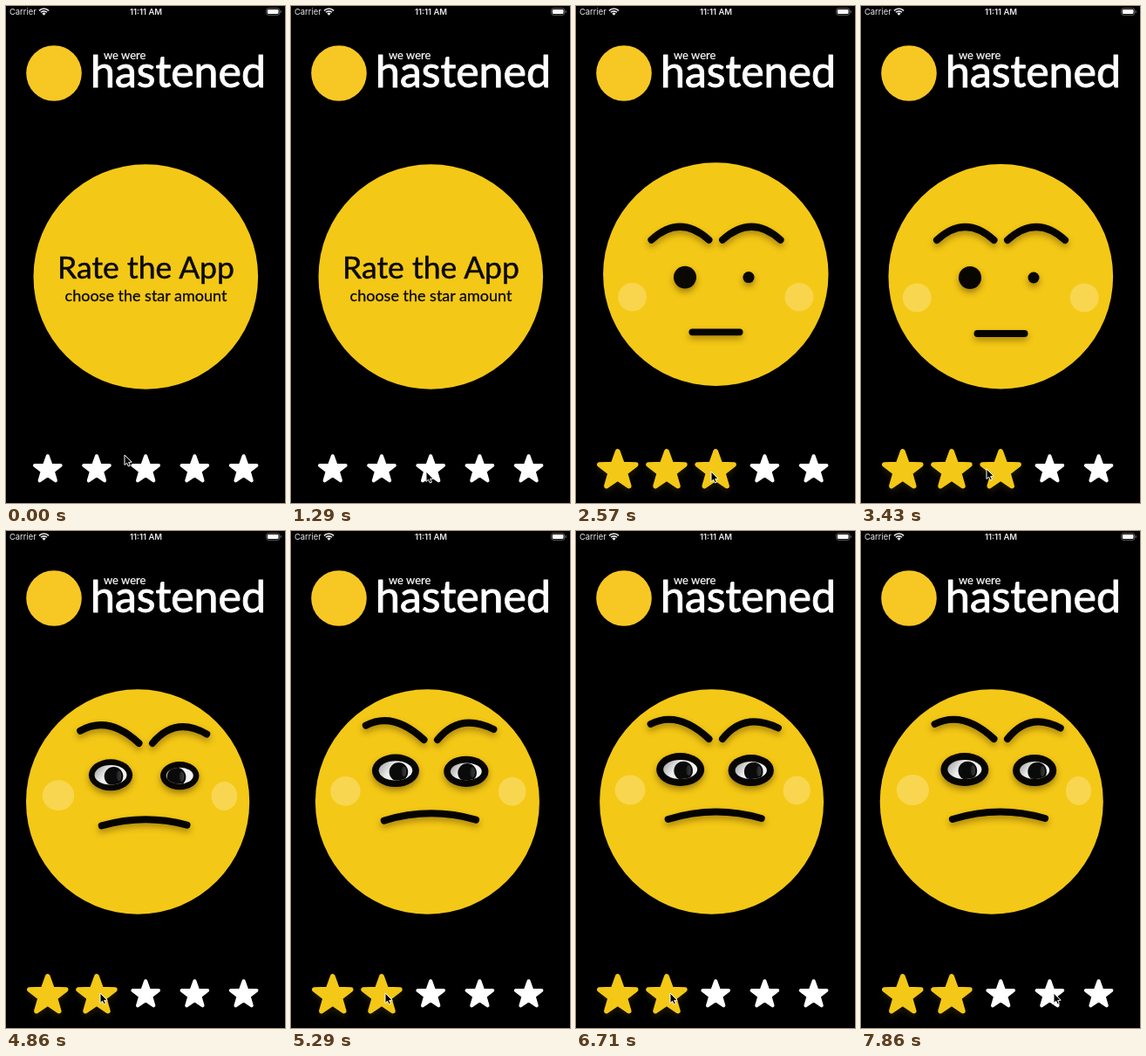
Animation of 320x569 px, one loop 8 s. Source, as an HTML page with a canvas:

```html
<!DOCTYPE html>
<html lang="en">
<head>
<meta charset="utf-8">
<title>Rate the App</title>
<style>
  html, body { margin: 0; width: 100%; height: 100%; overflow: hidden; background: #000; }
  canvas, svg { position: absolute; left: 0; top: 0; width: 320px; height: 569px; }
  text { font-family: Lato, "Open Sans", sans-serif; stroke-linejoin: round; }
  .bar { font-family: Inter, Roboto, sans-serif; fill: #e8e8e8; }
  .brand { fill: #fff; stroke: #fff; }
  #title { fill: #0b0a02; stroke: #0b0a02; text-anchor: middle; }
</style>
</head>
<body>
<canvas id="stage"></canvas>
<svg viewBox="0 0 320 569">
  <text class="bar" x="4" y="10" font-size="9.4">Carrier</text>
  <text class="bar" x="160.5" y="10" font-size="9.5" font-weight="600" text-anchor="middle">11:11 AM</text>
  <text class="brand" x="112" y="60.5" font-size="13" stroke-width=".2">we were</text>
  <text class="brand" x="97" y="93" font-size="50" stroke-width="1">hastened</text>
  <g id="title">
    <text x="160.5" y="312" font-size="35.5" stroke-width=".5">Rate the App</text>
    <text x="160.5" y="338" font-size="18" stroke-width=".3">choose the star amount</text>
  </g>
</svg>
<script>
const LOOP = 8000, TAP3 = 1500, TAP2 = 4140, HALF_TURN = 725;
const YELLOW = [244, 200, 22];
const canvas = document.getElementById('stage');
const title = document.getElementById('title');
const ctx = canvas.getContext('2d');
const dpr = window.devicePixelRatio || 1;
canvas.width = 320 * dpr;
canvas.height = 569 * dpr;

const clamp = v => Math.min(1, Math.max(0, v));
const mix = (a, b, p) => a + (b - a) * p;
const ease = v => { v = clamp(v); return v * v * (3 - 2 * v); };
const rgb = c => `rgb(${c.map(Math.round)})`;

// time, x, y of the pointer tip
const POINTER = [
  [0, 136, 514], [140, 136, 514], [1100, 155, 533], [2750, 155, 533],
  [3400, 144, 530], [3700, 144, 530], [4020, 108, 529],
  [7250, 108, 529], [7780, 221, 529], [LOOP, 221, 529]
];

function pointerAt(t) {
  const i = Math.max(1, POINTER.findIndex(k => k[0] > t));
  const a = POINTER[i - 1], b = POINTER[i];
  const p = ease((t - a[0]) / (b[0] - a[0]));
  return [mix(a[1], b[1], p), mix(a[2], b[2], p)];
}

function shadow(color, blur, dy) {
  ctx.shadowColor = color;
  ctx.shadowBlur = blur * dpr;
  ctx.shadowOffsetY = dy * dpr;
}
const noShadow = () => shadow('transparent', 0, 0);

function oval(x, y, rx, ry, fill) {
  ctx.beginPath();
  ctx.ellipse(x, y, Math.max(0, rx), Math.max(0, ry), 0, 0, Math.PI * 2);
  ctx.fillStyle = fill;
  ctx.fill();
}

// q: start, control and end point of a bent line
function bend(q, width) {
  ctx.beginPath();
  ctx.moveTo(q[0], q[1]);
  ctx.quadraticCurveTo(q[2], q[3], q[4], q[5]);
  ctx.lineWidth = width;
  ctx.lineCap = 'round';
  ctx.strokeStyle = '#050401';
  ctx.stroke();
}

function statusIcons() {
  ctx.strokeStyle = '#e8e8e8';
  ctx.lineCap = 'butt';
  ctx.lineWidth = 1.7;
  for (const r of [5, 7.8]) {
    ctx.beginPath();
    ctx.arc(43.5, 10.8, r, -Math.PI * 0.75, -Math.PI * 0.25);
    ctx.stroke();
  }
  ctx.beginPath();
  ctx.moveTo(43.5, 10.8);
  ctx.arc(43.5, 10.8, 3, -Math.PI * 0.75, -Math.PI * 0.25);
  ctx.fillStyle = '#e8e8e8';
  ctx.fill();

  ctx.lineWidth = 0.7;
  ctx.strokeStyle = '#888';
  ctx.beginPath();
  ctx.roundRect(298.7, 2.7, 15, 7.6, 2.2);
  ctx.stroke();
  ctx.fillStyle = '#fff';
  ctx.beginPath();
  ctx.roundRect(299.9, 3.9, 12.6, 5.2, 1.3);
  ctx.fill();
  ctx.fillStyle = '#888';
  ctx.fillRect(314.7, 5.2, 0.9, 2.6);
}

function star(x, on) {
  const R = mix(15.6, 22, on), y = mix(530.8, 531.8, on);
  const color = rgb(YELLOW.map(c => mix(255, c, on)));
  ctx.beginPath();
  for (let i = 0; i < 10; i++) {
    const r = i % 2 ? R * 0.41 : R, a = i * Math.PI / 5 - Math.PI / 2;
    ctx.lineTo(x + r * Math.cos(a), y + r * Math.sin(a));
  }
  ctx.closePath();
  ctx.lineJoin = 'round';
  ctx.lineWidth = mix(4, 5.6, on);
  ctx.fillStyle = ctx.strokeStyle = color;
  shadow(`rgba(244,200,22,${0.12 * on})`, 6, 4);
  ctx.stroke();
  noShadow();
  ctx.fill();
}

function stars(t) {
  const up = ease((t - TAP3) / 300), down = ease((t - TAP2) / 300);
  for (let i = 0; i < 5; i++) {
    star(47.8 + i * 56.2, i < 2 ? up : i === 2 ? up * (1 - down) : 0);
  }
}

function eye(x, y, rx, ry, open, px) {
  shadow('rgba(60,40,0,.45)', 7, 4);
  oval(x, y, rx, ry, '#080602');
  noShadow();
  if (open < 0.02) return;
  const ix = rx - 8 * open, iy = ry - 8 * open;
  ctx.save();
  ctx.globalAlpha *= ease(open * 1.5);
  const white = ctx.createLinearGradient(x - ix, y - iy, x + ix * 0.6, y + iy);
  white.addColorStop(0, '#999');
  white.addColorStop(0.45, '#eee');
  white.addColorStop(1, '#f4f4f4');
  oval(x, y, ix, iy, white);
  ctx.beginPath();
  ctx.ellipse(x, y, Math.max(0, ix), Math.max(0, iy), 0, 0, Math.PI * 2);
  ctx.clip();
  const r = 10.8;
  oval(px, y + 1.5, r, r, '#0a0a0a');
  const glint = ctx.createLinearGradient(px, y, px + r, y);
  glint.addColorStop(0, 'rgba(90,90,90,0)');
  glint.addColorStop(1, 'rgba(90,90,90,.8)');
  oval(px + r * 0.55, y + 1, r * 0.25, r * 0.55, glint);
  ctx.restore();
}

function face(t) {
  const s = (t - TAP3) / 1000, u = Math.max(0, t - TAP2) / 1000;
  // b: bounce of the first tap, m: frown, k: head turn
  const b = s < 0 ? 0 : 1.43 * ease(s / 0.25) * Math.exp(-3.24 * Math.max(0, s - 0.25));
  const w = 4.5 * u, m = 1 - (1 + w) * Math.exp(-w);
  const k = m * (1 - Math.cos(Math.PI * u * 1000 / HALF_TURN)) / 2;
  const cx = 160.3 - 11 * k;

  oval(cx, 310 - 29 * b, 128.8 + 4 * b - 0.8 * k, 128.8 - 9.5 * b, rgb(YELLOW));
  const shown = s < 0 ? 0 : ease(s / 0.45);
  if (!shown) return;

  const blend = (a, c) => a.map((v, i) => mix(v, c[i], m));
  const widen = (q, f, dy) => q.map((v, i) => i % 2 ? v + dy * b : 160.5 + (v - 160.5) * (1 + f * b));
  ctx.save();
  ctx.globalAlpha = shown * clamp(1 - 0.12 * b);

  const cheekY = mix(334 - 7 * b, 296.5, m);
  const cheek = `rgba(255,240,190,${0.34 * clamp(1 - 0.45 * b)})`;
  oval(64.2 + 4 * b - 5 * k, cheekY, 16.5 + 2.2 * k, 16.5 - 3 * b + k, cheek);
  oval(256.2 - 3 * b - 7 * k, cheekY + k, 16.5 - 2 * k, 16.5 - 3 * b, cheek);

  shadow('rgba(70,45,0,.42)', 7, 4);
  const left = blend([87, 268, 119.5, 238, 152.5, 268], [86.5 - 2 * k, 221, 117, 205, 152.5, 238]);
  const right = blend([168, 268, 201, 238, 234, 268], [168, 238, 193, 206.5, 234.5 - 6 * k, 225.5]);
  bend(widen(left, 0.075, -2.5), 8);
  bend(widen(right, 0.075, -2.5), 8);
  const mouth = blend(
    [133.5, 375, 160.5, 375, 187.5, 375],
    [106.3 - 1.5 * k, 330, 160 - 2 * k, 313.5, 214 - 3 * k, 329]
  );
  bend(widen(mouth, 0.05, -17), 8 - 2 * clamp(b));
  noShadow();

  const eyeY = mix(311 - 4 * b, 273, m);
  const lx = mix(125, 120.3 - 1.5 * k, m), rx = mix(198, 202 - 3 * k, m);
  eye(lx, eyeY, mix(13, 27.5, m), mix(13 - 2 * b, 19, m), m, lx + 3.5);
  eye(rx, eyeY + m, mix(6.5 + b, 27 - 2 * k, m), mix(6.5, 18, m), m, rx + mix(-10, 3, m ** 4));
  ctx.restore();
}

function pointer(t) {
  const [x, y] = pointerAt(t);
  const outline = [0, 0, 0, 11.5, 2.6, 9.2, 4.4, 13, 6.4, 12.1, 4.7, 8.4, 8.2, 8.2];
  ctx.beginPath();
  for (let i = 0; i < outline.length; i += 2) ctx.lineTo(x + outline[i], y + outline[i + 1]);
  ctx.closePath();
  ctx.lineJoin = 'miter';
  ctx.lineWidth = 1;
  ctx.fillStyle = '#000';
  ctx.strokeStyle = '#fff';
  ctx.fill();
  ctx.stroke();
}

function draw() {
  const t = performance.now() % LOOP;
  ctx.setTransform(dpr, 0, 0, dpr, 0, 0);
  ctx.fillStyle = '#000';
  ctx.fillRect(0, 0, 320, 569);
  statusIcons();
  oval(55, 77, 31.8, 31.8, '#f7c823');
  face(t);
  stars(t);
  pointer(t);
  title.style.opacity = 1 - ease((t - TAP3) / 220);
  requestAnimationFrame(draw);
}
draw();
</script>
</body>
</html>
```
